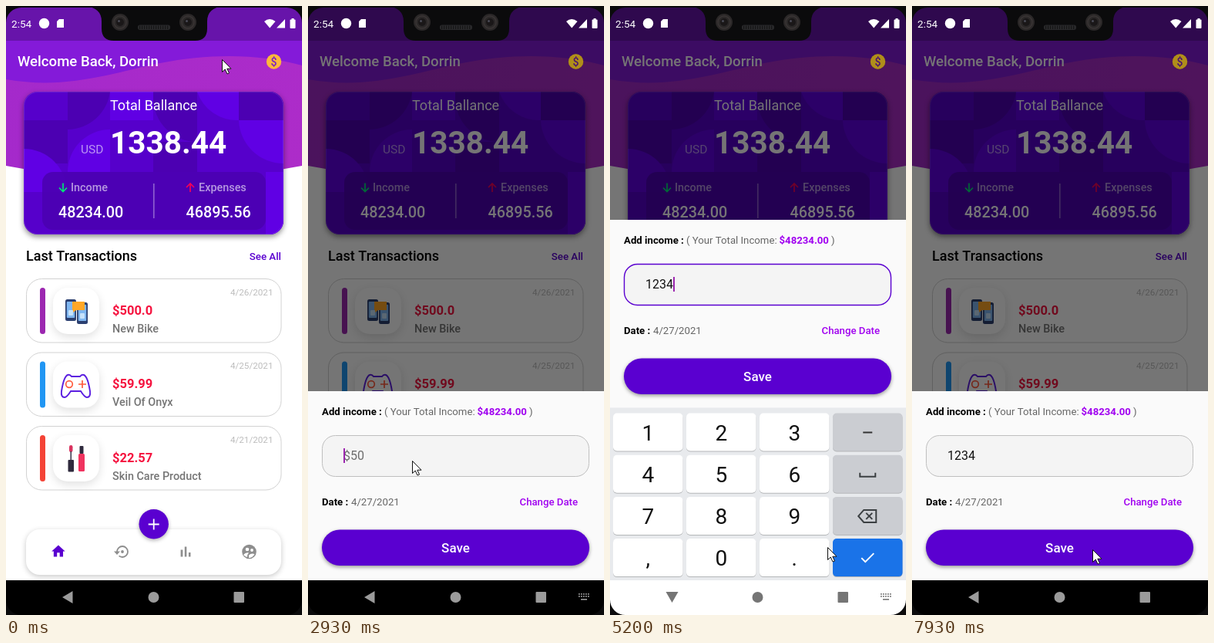
An HTML page with a canvas for the animation above (8000 ms loop, 384 by 789 pixels).

```html
<!DOCTYPE html>
<html lang="en">
<head>
<meta charset="utf-8">
<title>Wallet</title>
<style>
html, body { margin: 0; width: 100%; height: 100%; overflow: hidden; background: #000; }
canvas { display: block; width: 384px; height: 789px; }
</style>
</head>
<body>
<canvas id="stage"></canvas>
<script>
const W = 384, H = 789, LOOP = 8000, NAV_TOP = 744;
const PRIMARY = '#5a00d0', ACCENT = '#a000f0';
const canvas = document.getElementById('stage');
const ratio = window.devicePixelRatio || 1;
canvas.width = W * ratio;
canvas.height = H * ratio;
const c = canvas.getContext('2d');

const clamp = v => Math.max(0, Math.min(1, v));
const span = (t, a, b) => clamp((t - a) / (b - a));
const easeOut = p => 1 - (1 - p) ** 3;
const smooth = p => p * p * (3 - 2 * p);
const mix = (a, b, p) => a + (b - a) * p;

function rr(x, y, w, h, r, fill, stroke, lineWidth = 1) {
  c.beginPath();
  c.roundRect(x, y, w, h, r);
  if (fill) { c.fillStyle = fill; c.fill(); }
  if (stroke) { c.strokeStyle = stroke; c.lineWidth = lineWidth; c.stroke(); }
}

function shadowed(color, blur, dy, draw) {
  c.save();
  c.shadowColor = color;
  c.shadowBlur = blur * ratio;
  c.shadowOffsetY = dy * ratio;
  draw();
  c.restore();
}

function disc(x, y, r, fill) {
  c.beginPath();
  c.arc(x, y, r, 0, Math.PI * 2);
  c.fillStyle = fill;
  c.fill();
}

function ring(x, y, r, stroke, lineWidth = 1) {
  c.beginPath();
  c.arc(x, y, r, 0, Math.PI * 2);
  c.strokeStyle = stroke;
  c.lineWidth = lineWidth;
  c.stroke();
}

function text(s, x, y, size, color, weight = 400, align = 'left') {
  c.font = `${weight} ${size}px Roboto, sans-serif`;
  c.textAlign = align;
  c.fillStyle = color;
  c.fillText(s, x, y);
}

function shape(d, x, y, scale, fill, stroke, lineWidth) {
  const p = new Path2D(d);
  c.save();
  c.translate(x, y);
  c.scale(scale, scale);
  if (fill) { c.fillStyle = fill; c.fill(p); }
  if (stroke) { c.strokeStyle = stroke; c.lineWidth = lineWidth; c.stroke(p); }
  c.restore();
}

const line = (d, color, width) => shape(d, 0, 0, 1, null, color, width);

// ---- home page ----

function header() {
  const low = c.createLinearGradient(0, 80, W, 200);
  low.addColorStop(0, '#a429cb');
  low.addColorStop(1, '#ad2cc9');
  shape('M0 0H384V207Q192 243 0 207Z', 0, 0, 1, low);
  shape('M0 0H384V77C330 62 265 61 200 74C140 86 80 109 0 95Z', 0, 0, 1, '#841ad9');
  c.fillStyle = 'rgba(0,0,0,.22)';
  c.fillRect(0, 0, W, 45);
  text('Welcome Back, Dorrin', 15, 78, 18.6, '#fff', 500);
}

function coin(gold, ink) {
  disc(347.5, 72, 9.7, gold);
  text('$', 347.5, 77, 14, ink, 500, 'center');
}

const DARK = '#4c00b2', BRIGHT = '#6000e4';

function cardPattern() {
  c.save();
  c.beginPath();
  c.roundRect(23, 111, 337, 185, 18);
  c.clip();
  shape('M23 148H80V204H23ZM80 111H135A56 56 0 0 1 80 160ZM302 111H360V148H302Z', 0, 0, 1, DARK);
  shape('M191 111H248V176A57 57 0 0 1 191 119ZM191 176H248V215H191Z', 0, 0, 1, DARK);
  shape('M23 185A56 56 0 0 1 79 241H23ZM135 111H191V148H135ZM80 215A55 55 0 0 1 135 160V215Z', 0, 0, 1, BRIGHT);
  shape('M248 111H302V148A54 54 0 0 1 248 111ZM302 148H360V204A58 58 0 0 1 302 148ZM337 215H360V296H337Z', 0, 0, 1, BRIGHT);
  c.restore();
}

function balanceCard() {
  shadowed('rgba(0,0,0,.45)', 7, 3, () => rr(23, 111, 337, 185, 18, '#5600cb'));
  cardPattern();
  rr(23.5, 111.5, 336, 184, 18, null, 'rgba(255,255,255,.12)');
  rr(47, 215, 290, 75, 14, 'rgba(76,0,178,.9)');

  text('Total Ballance', 135, 135, 18, '#fff');
  text('USD', 97, 191, 15.5, 'rgba(255,255,255,.58)');
  text('1338.44', 135, 191, 40.5, '#fff', 700);
  text('Income', 84, 240, 14.4, 'rgba(255,255,255,.6)', 500);
  text('48234.00', 68, 274, 19.8, '#fff', 500);
  text('Expenses', 250, 240, 14.4, 'rgba(255,255,255,.6)', 500);
  text('46895.56', 233.5, 274, 19.8, '#fff', 500);
  line('M74 229.5V240M69 235.5L74 240.5L79 235.5', '#00e676', 1.7);
  line('M239 241V230M234 235L239 230L244 235', '#f50057', 1.7);
  c.fillStyle = 'rgba(255,255,255,.38)';
  c.fillRect(191, 230, 1.6, 45);
}

function phonesIcon() {
  for (const [x, y] of [[77, 380], [92, 384]]) {
    rr(x, y, 14, 28, 2.5, '#2b3f70');
    rr(x + 1.8, y + 3, 10.4, 21, 1, '#7fb6f0');
    rr(x + 4, y + 14, 6, 7, 1, '#c6e2fb');
  }
  shape('M86 383H102V394H91L87 397V394H86Z', 0, 0, 1, '#ffa726');
}

function gamepadIcon() {
  line('M80 478Q83 477 85 480H96Q98 477 101 478Q106 480 109 499Q110 507 105 507Q102 507 97 499H84Q79 507 76 507Q71 507 72 499Q75 480 80 478Z', '#5b1fe0', 1.9);
  ring(82, 490, 4.3, '#ff5a3c', 1.7);
  line('M94 490H104M99 485V495', '#ff5a3c', 1.7);
}

function makeupIcon() {
  rr(82, 569, 4.5, 9, 2.2, '#d9335f');
  rr(83.5, 577, 1.5, 12, 0, '#39324b');
  rr(80.5, 588, 7.5, 15.5, 1, '#2f2a3d');
  rr(95.5, 570, 5, 10, 1, '#2f2a3d');
  rr(94, 580, 8, 23, 1.5, '#f0335f');
}

const ITEMS = [
  ['#9c27b0', '$500.0', 'New Bike', '4/26/2021', phonesIcon],
  ['#2196f3', '$59.99', 'Veil Of Onyx', '4/25/2021', gamepadIcon],
  ['#f44336', '$22.57', 'Skin Care Product', '4/21/2021', makeupIcon]
];

function transactions() {
  text('Last Transactions', 26, 330, 18, '#000', 500);
  text('See All', 357, 329, 13.3, PRIMARY, 500, 'right');
  ITEMS.forEach(([color, amount, label, date, icon], i) => {
    const y = 353 + i * 95.5;
    rr(26.5, y + .5, 330.5, 82.5, 20, '#fff', '#d2d2d2');
    rr(44, y + 12, 7, 60, 3.5, color);
    shadowed('rgba(0,0,0,.12)', 12, 4, () => rr(61, y + 12, 60, 60, 19, '#fff'));
    icon();
    text(amount, 138, y + 46.5, 16.5, '#f5133f', 700);
    text(label, 138, y + 69.5, 14.4, '#757575', 500);
    text(date, 346.5, y + 21.5, 11.7, '#bdbdbd', 400, 'right');
  });
}

function tabBar() {
  const grey = '#8e8e8e';
  shadowed('rgba(0,0,0,.22)', 7, 2, () => rr(26, 678, 331, 59, 18, '#fff'));
  shape('M10 20v-6h4v6h5v-8h3L12 3 2 12h3v8z', 57.5, 696, .87, PRIMARY);
  c.beginPath();
  c.arc(151, 707, 7, Math.PI, Math.PI * 2.72);
  c.strokeStyle = grey;
  c.lineWidth = 1.8;
  c.stroke();
  shape('M140 706.5H148L144 711Z', 0, 0, 1, grey);
  disc(151, 707, 1.9, grey);
  shape('M5 9.2h3V19H5zM10.6 5h2.8v14h-2.8zm5.6 8H19v6h-2.8z', 222, 696, .92, grey);
  disc(315.5, 707, 9.3, grey);
  disc(313, 704, 2.3, '#fff');
  disc(319, 705, 1.9, '#fff');
  shape('M308 711Q311 707.5 315 708.5Q313 710 313 714Q310 713.5 308 711ZM315 715V711.5Q318 708.5 322.5 710Q320 715 315 715Z', 0, 0, 1, '#fff');
  shadowed('rgba(0,0,0,.3)', 5, 2, () => disc(191.7, 671.2, 19.2, PRIMARY));
  line('M184.7 671.5H198.7M191.7 664.5V678.5', '#fff', 1.8);
}

function home(t) {
  c.fillStyle = '#fff';
  c.fillRect(0, 0, W, H);
  header();
  coin('#ffb83c', '#7a1cc4');
  if (t >= 1330 && t < 1820) {
    const alpha = .5 * span(t, 1300, 1400) * (1 - span(t, 1600, 1820));
    disc(347.5, 71.5, mix(12, 33, easeOut(span(t, 1330, 1530))), `rgba(150,140,155,${alpha})`);
  }
  balanceCard();
  transactions();
  tabBar();
}

// ---- income sheet ----

const FOCUS = 2960, DONE = 7550, COMPACT = 6130, REST = 499;
const KEYS = '123-456 789<,0.+';
// key index, press time, release time
const PRESSES = [[0, 3970, 4070], [1, 4200, 4290], [2, 4450, 4540], [4, 4840, 4930], [15, 5500, 6100], [15, 7450, DONE]];
const TYPED = [4070, 4290, 4540, 4930];

function sheetTop(t) {
  if (t < 1900) return mix(NAV_TOP, REST, easeOut(span(t, 1560, 1810)));
  if (t < COMPACT) return mix(REST, 277, easeOut(span(t, 2980, 3480)));
  if (t < DONE) return mix(277, 307, easeOut(span(t, COMPACT, COMPACT + 280)));
  return mix(307, REST, easeOut(span(t, 7590, 7890)));
}

function caretOn(t) {
  if (t < 2900 || t >= DONE) return false;
  const last = [2930, ...TYPED].filter(x => x <= t).pop() || 2930;
  return Math.floor((t - last) / 500) % 2 === 0;
}

function sheet(t) {
  const focused = t >= FOCUS && t < DONE;
  c.save();
  c.translate(0, sheetTop(t));
  c.fillStyle = '#fafafa';
  c.fillRect(0, 0, W, H);
  text('Add income :', 18, 31, 13.2, '#000', 700);
  text('( Your Total Income:', 99, 31, 13.2, '#666');
  text('$48234.00', 219.5, 31, 13.2, ACCENT, 700);
  text(')', 287, 31, 13.2, '#666');
  rr(18.5, 57.5, 346, 53, 17, '#f4f4f4', focused ? PRIMARY : '#bfbfbf', focused ? 1.4 : 1);
  const value = '1234'.slice(0, TYPED.filter(x => x <= t).length);
  text(value || '$50', 46, 89, 16, value ? '#111' : '#6e6e6e');
  if (caretOn(t)) {
    c.fillStyle = '#9c27b0';
    c.fillRect(46 + (value ? c.measureText(value).width : 0), 74, 2, 19);
  }
  text('Date :', 18, 147.5, 13.2, '#000', 700);
  text('4/27/2021', 56, 147.5, 13.2, '#666');
  text('Change Date', 350, 147.5, 13.2, ACCENT, 500, 'right');
  shadowed('rgba(0,0,0,.4)', 5, 2, () => rr(18, 179.5, 347, 46.5, 23, PRIMARY));
  text('Save', 191.5, 208.5, 17, '#fff', 500, 'center');
  c.restore();
}

function keyFace(key, x, y, size) {
  c.save();
  c.translate(x, y);
  if (key === '-') line('M-6 0H6', '#333', 2);
  else if (key === ' ') line('M-10 -2V3H10V-2', '#3c4043', 2);
  else if (key === '+') line('M-8 0L-3 5L8 -6', '#fff', 2);
  else if (key === '<') {
    line('M-12 0L-5 -8H11V8H-5Z', '#3c4043', 2);
    line('M-2 -4L6 4M6 -4L-2 4', '#3c4043', 2);
  } else text(key, 0, size * .36, size, '#111', 400, 'center');
  c.restore();
}

function sidePanel() {
  const ink = '#5f6368';
  c.fillStyle = '#c6c8cd';
  c.fillRect(0, 552, 51, NAV_TOP - 552);
  line('M19 587V583H23M29 583H33V587M33 593V597H29M23 597H19V593M19 583L23 587M33 583L29 587M33 597L29 593M19 597L23 593', ink, 1.8);
  line('M29 641L22 648L29 655', ink, 2);
  line('M23 704H17.5V715.5H29V710M22 711L32 701M25 701H32V708', ink, 1.8);
  c.setLineDash([2, 2]);
  line('M21 698H35V713', ink, 1.8);
  c.setLineDash([]);
}

function keyboard(t) {
  if (t < 2980 || t >= 7800) return;
  const compact = t >= COMPACT;
  const shut = span(t, DONE, 7800);
  const drop = t < DONE ? 224 * (1 - easeOut(span(t, 2980, 3400))) : 200 * shut * shut;
  const g = compact
    ? { bg: 552, x: 60, dx: 79.5, w: 75.5, y: 557, dy: 46.7, h: 42, size: 24 }
    : { bg: 520.5, x: 4, dx: 95, w: 90.5, y: 527.5, dy: 54.2, h: 49, size: 28 };
  c.save();
  c.translate(0, drop);
  c.fillStyle = '#e8eaed';
  c.fillRect(0, g.bg, W, H);
  if (compact) sidePanel();
  [...KEYS].forEach((key, i) => {
    const x = g.x + (i % 4) * g.dx, y = g.y + Math.floor(i / 4) * g.dy;
    const down = PRESSES.some(([k, a, b]) => k === i && t >= a && t < b);
    const fill = i === 15 ? (down ? '#1665cc' : '#1a73e8')
      : i % 4 === 3 ? '#cbcdd2' : down ? '#d3d5d9' : '#fff';
    rr(x, y + 1, g.w, g.h, 5, 'rgba(0,0,0,.22)');
    rr(x, y, g.w, g.h, 5, fill);
    keyFace(key, x + g.w / 2, y + g.h / 2 + .5, g.size);
  });
  c.restore();
}

// ---- system chrome ----

function navBar(t) {
  const light = t < DONE ? span(t, 2980, 3120) : 1 - span(t, 7640, 7800);
  const open = t >= 2980 && t < 7720;
  const v = Math.round(255 * light);
  const ink = light > .5 ? '#757575' : '#9b9b9b';
  c.fillStyle = `rgb(${v},${v},${v})`;
  c.fillRect(0, NAV_TOP, W, H - NAV_TOP);
  shape(open ? 'M72.5 759H88.5L80.5 773Z' : 'M73 766L86.5 758V774Z', 0, 0, 1, ink);
  disc(191.5, 766, 7, ink);
  rr(295.5, 759, 13.5, 14, 1, ink);
  if (t >= 2900 && t < 7800) {
    for (let i = 0; i < 10; i++) rr(351 + (i % 5) * 3, 761 + Math.floor(i / 5) * 3, 1.7, 1.7, 0, ink);
    rr(354, 768, 8, 1.6, 0, ink);
  }
}

function statusBar() {
  text('2:54', 7, 28, 13.6, '#fff');
  disc(49.5, 22.5, 6.7, '#fff');
  shape('M69 17H75V28H66V20Z', 0, 0, 1, '#fff');
  shape('M335 20Q342 14 349.5 20L342.2 28.5Z', 0, 0, 1, '#fff');
  shape('M362 17V28.5H351Z', 0, 0, 1, '#fff');
  rr(368.5, 17.5, 7, 11.5, 1, '#fff');
  rr(370.5, 16, 3, 2, 0, '#fff');
}

function bezel() {
  shape('M102 0Q124 2 124 20V29Q124 45 140 45H245Q261 45 261 29V20Q261 2 283 0Z', 0, 0, 1, '#0b0b0c');
  for (const x of [148, 236]) {
    disc(x, 21, 11, '#2b2828');
    ring(x, 21, 8, '#3a3535', 1.5);
    disc(x, 21, 5, '#1a1718');
    disc(x - 1.5, 19.5, 1.5, '#4a4a55');
  }
  rr(171, 24.5, 42, 6.5, 3, '#29292b');
  c.fillStyle = '#151515';
  for (let x = 173; x < 212; x += 3) c.fillRect(x, 25.5, 1.2, 4.5);
  c.beginPath();
  c.rect(0, 0, W, H);
  c.roundRect(0, 2, W, H - 2, 20);
  c.fillStyle = '#0b0b0c';
  c.fill('evenodd');
}

// time, x, y
const POINTER = [
  [70, 280, 69], [450, 310, 64.5], [870, 344, 71], [1000, 346, 71], [2250, 346, 71],
  [2530, 136, 589], [2700, 135, 589], [3740, 135, 589], [3950, 52, 560], [4070, 52, 560],
  [4190, 146, 558], [4290, 146, 558], [4440, 240, 558], [4540, 240, 558], [4830, 52, 606],
  [4930, 52, 606], [5200, 282, 701], [5470, 350, 719], [6100, 350, 719], [7000, 158, 664],
  [7420, 336, 715], [7560, 336, 715], [7900, 234, 704]
];

function pointer(t) {
  const next = POINTER.findIndex(p => p[0] > t);
  const b = POINTER[next < 0 ? POINTER.length - 1 : next];
  const a = next < 0 ? b : POINTER[Math.max(0, next - 1)];
  const p = a === b ? 0 : smooth(span(t, a[0], b[0]));
  shape('M.5 .5V16.5L4.2 13L7 19L9.5 18L6.8 12.2H12Z', mix(a[1], b[1], p), mix(a[2], b[2], p), 1, '#fff', '#111', 1);
}

function draw(t) {
  c.setTransform(ratio, 0, 0, ratio, 0, 0);
  home(t);
  if (t >= 1560) {
    const shade = easeOut(span(t, 1560, 1810));
    c.fillStyle = `rgba(0,0,0,${.54 * shade})`;
    c.fillRect(0, 0, W, NAV_TOP);
    c.globalAlpha = shade;
    coin('#b08e1a', '#4b1270');
    c.globalAlpha = 1;
    sheet(t);
    keyboard(t);
  }
  navBar(t);
  statusBar();
  bezel();
  pointer(t);
}

const start = performance.now();
function tick() {
  draw((performance.now() - start) % LOOP);
  requestAnimationFrame(tick);
}
tick();
</script>
</body>
</html>
```
